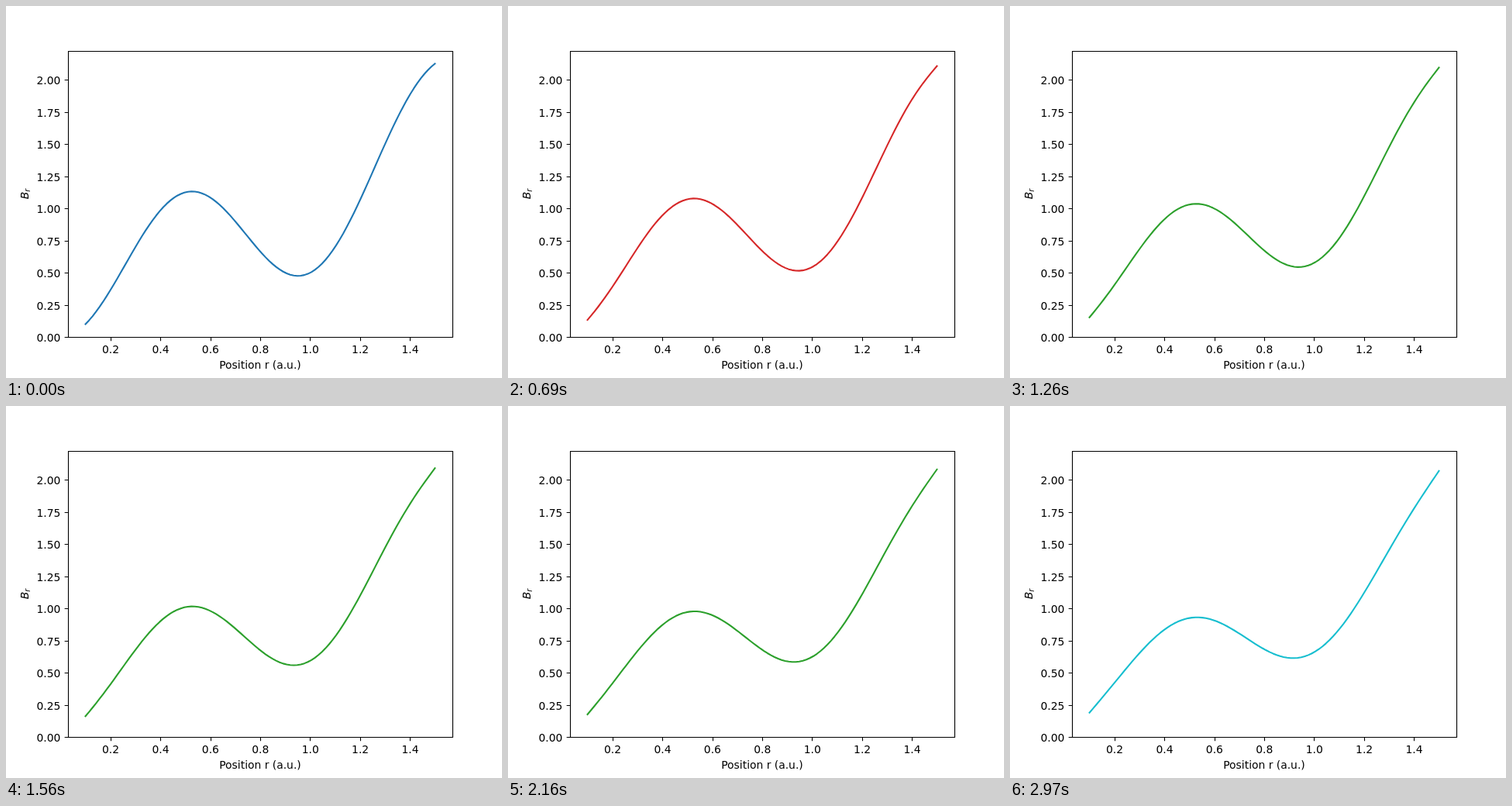
Write an HTML page that moves like this. It is 640 px wide and 480 px high and loops after 3 s.

```html
<!DOCTYPE html>
<html lang="en">
<head>
<meta charset="utf-8">
<title>Field diffusion</title>
<style>
  html, body { margin: 0; width: 100%; height: 100%; overflow: hidden; background: #fff; }
  svg { display: block; width: 640px; height: 480px; }
  text { font: 13.89px "DejaVu Sans", sans-serif; fill: #000; }
  #axes { fill: none; stroke: #000; stroke-width: 1.11; }
  #curve { fill: none; stroke-width: 2.083; stroke-linecap: square; stroke-linejoin: round; }
  .x { text-anchor: middle; }
  .y { text-anchor: end; }
  .math { font-style: oblique; }
</style>
</head>
<body>
<svg viewBox="0 0 640 480">
  <path id="curve"/>
  <path id="axes"/>
  <g id="labels"></g>
  <text class="x" x="328" y="468">Position r (a.u.)</text>
  <text class="math" transform="translate(29 249.2) rotate(-90)">B<tspan dy="2.3" font-size="9.72" style="font-size:9.72px">r</tspan></text>
</svg>
<script>
const STEP = 30, FRAMES = 100, N = 100;
const R0 = 0.1, R1 = 1.5, H = (R1 - R0) / (N - 1);
const DIFFUSION = 1e-4, DECAY = 2.2, SUBSTEPS = 4;
const COLORS = ['#1f77b4', '#ff7f0e', '#2ca02c', '#d62728', '#9467bd',
                '#8c564b', '#e377c2', '#7f7f7f', '#bcbd22', '#17becf'];

const px = r => 80 + (r - 0.03) * 496 / 1.54;
const py = b => 427.2 - b * 369.6 / 2.2262;
const snap = v => Math.floor(v + 0.5) + 0.5;
const radius = i => R0 + i * H;
const curve = document.getElementById('curve');

// Cylindrical diffusion with open ends and a weak uniform decay
function advance(u) {
  const last = N - 1;
  return u.map((b, i) => {
    const r = radius(i);
    const lo = Math.max(i - 1, 0), hi = Math.min(i + 1, last);
    const mid = Math.min(Math.max(i, 1), last - 1);
    const slope = (u[hi] - u[lo]) / ((hi - lo) * H);
    const bend = (u[mid + 1] - 2 * u[mid] + u[mid - 1]) / (H * H);
    const weight = mid === i ? 1 : 0.5;
    const rate = weight * bend + slope / r - b / (r * r) - DECAY * b;
    return b + DIFFUSION / SUBSTEPS * rate;
  });
}

const toPath = u => 'M' + u.map((b, i) => px(radius(i)).toFixed(2) + ' ' + py(b).toFixed(2)).join('L');

function buildPaths() {
  let u = Array.from({ length: N }, (_, i) => {
    const r = radius(i);
    return r * r / 2 + Math.sin(Math.PI * r) ** 2;
  });
  const paths = [];
  for (let n = 0; n < FRAMES; n++) {
    paths.push(toPath(u));
    for (let s = 0; s < SUBSTEPS; s++) u = advance(u);
  }
  return paths;
}

function addLabel(kind, x, y, value) {
  const el = document.createElementNS('http://www.w3.org/2000/svg', 'text');
  el.setAttribute('class', kind);
  el.setAttribute('x', x);
  el.setAttribute('y', y);
  el.textContent = value;
  document.getElementById('labels').append(el);
}

function drawAxes() {
  let d = 'M80.5 58.5H576.5V427.5H80.5Z';
  for (let i = 1; i <= 7; i++) {
    const x = px(i * 0.2);
    d += `M${snap(x)} 427.5v4.86`;
    addLabel('x', x + 0.3, 448, (i * 0.2).toFixed(1));
  }
  for (let i = 0; i <= 8; i++) {
    const y = snap(py(i * 0.25));
    d += `M80.5 ${y}h-4.86`;
    addLabel('y', 70.3, y + 5, (i * 0.25).toFixed(2));
  }
  document.getElementById('axes').setAttribute('d', d);
}

const paths = buildPaths();
let shown = -1;

function render() {
  const n = Math.floor(performance.now() / STEP) % FRAMES;
  if (n !== shown) {
    shown = n;
    curve.setAttribute('d', paths[n]);
    curve.setAttribute('stroke', COLORS[n % COLORS.length]);
  }
  requestAnimationFrame(render);
}

drawAxes();
render();
</script>
</body>
</html>
```
